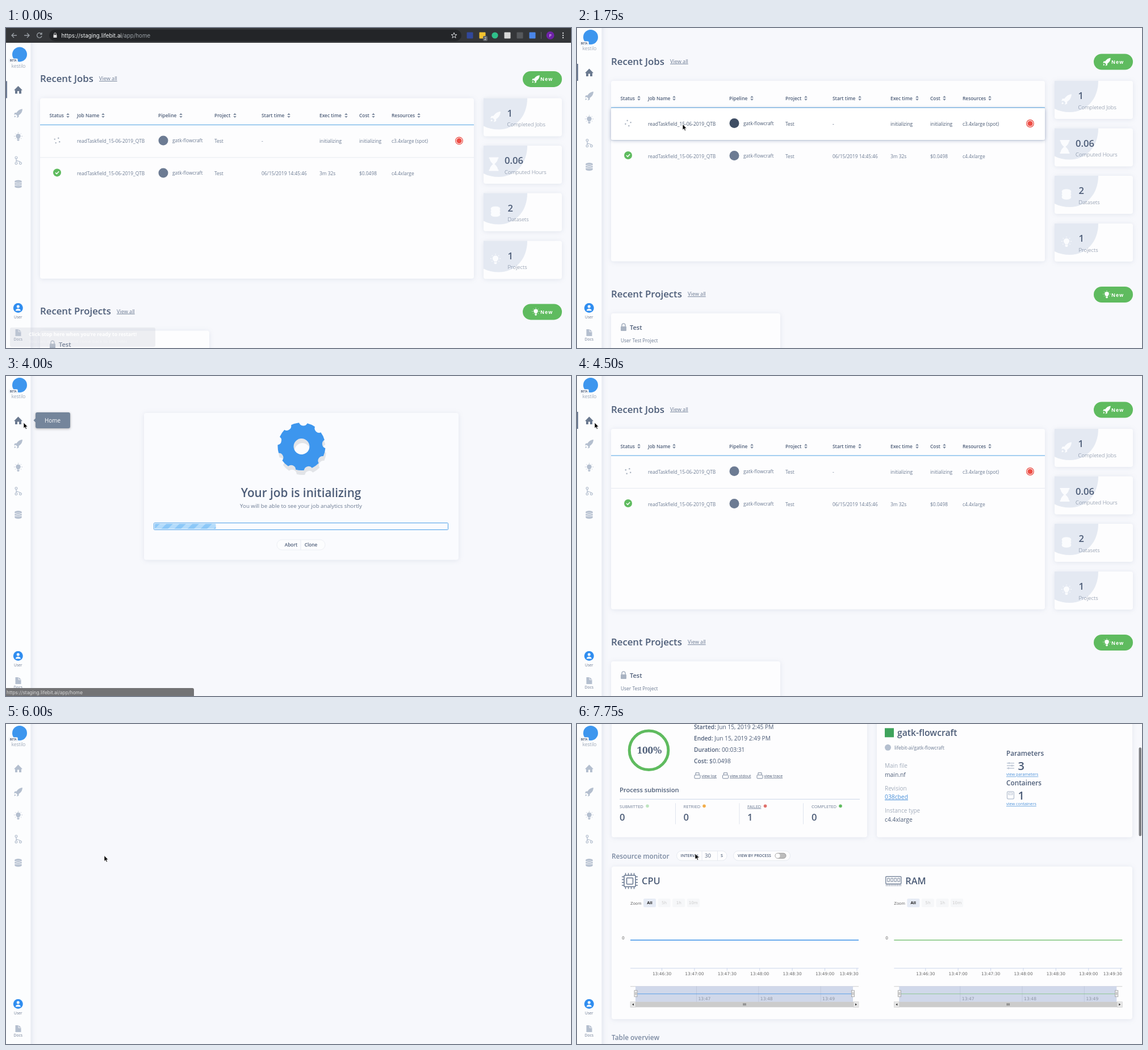
An HTML page for the animation above (8 s loop, 995 by 563 pixels).

```html
<!DOCTYPE html>
<html lang="en">
<head>
<meta charset="utf-8">
<title>Job dashboard</title>
<style>
html, body { margin: 0; width: 100%; height: 100%; overflow: hidden; background: #f7f8fc; }
svg { display: block; width: 100vw; height: 100vh; font-family: "Open Sans", sans-serif; fill: #6c7b93; }
text { white-space: pre; }
.l { font-weight: 300; }
.m { font-weight: 600; }
.b { font-weight: 700; }
.u { text-decoration: underline; }
.c { text-anchor: middle; }
.axis { font-family: "DejaVu Sans", sans-serif; }
.ui { font-family: Inter, sans-serif; }
.serif { font-family: "Noto Serif", serif; font-weight: 600; }
.card { fill: #fdfdfe; filter: drop-shadow(0 1px 4px rgba(80, 100, 140, .13)); }
.line { fill: none; stroke: #e3e8f0; }
.hover { fill: #fff; filter: drop-shadow(0 1px 3px rgba(70, 95, 140, .4)); }
.hot { fill: #4a5a73; }
.hot .mark { fill: #3f4e64; }
</style>
</head>
<body>
<svg id="stage" viewBox="0 0 995 563" preserveAspectRatio="none"></svg>
<script>
const INK = '#4d5d78', SOFT = '#6c7b93', PALE = '#b4bfcf', BLUE = '#3d96ee', GREEN = '#5fbb5f';
const JOB = 'readTaskfield_15-06-2019_QTB';
const LINK = '#4a90d9';

// Text is placed by the middle of its capitals.
const text = (x, y, s, size = 8.4, fill = '', cls = '', extra = '') =>
  `<text x="${x}" y="${(y + size * .36).toFixed(2)}" font-size="${size}" class="${cls}" ${fill && `fill="${fill}"`} ${extra}>${s}</text>`;
const rect = (x, y, w, h, r = 0, attrs = '') =>
  `<rect x="${x}" y="${y}" width="${w}" height="${h}" rx="${r}" ${attrs}/>`;
const dot = (x, y, r, fill, attrs = '') => `<circle cx="${x}" cy="${y}" r="${r}" fill="${fill}" ${attrs}/>`;
const path = (d, attrs = '') => `<path d="${d}" ${attrs}/>`;
const stroke = (color, width = 1) => `fill="none" stroke="${color}" stroke-width="${width}"`;
const hline = (x1, x2, y, color, w = 1) => path(`M${x1} ${y}H${x2}`, stroke(color, w));
const vline = (x, y1, y2, color, w = 1) => path(`M${x} ${y1}V${y2}`, stroke(color, w));
const group = (id, body, attrs = '') => `<g id="${id}" ${attrs}>${body}</g>`;
const at = (x, y, body, attrs = '', k = 1) => `<g transform="translate(${x} ${y}) scale(${k})" ${attrs}>${body}</g>`;
const repeat = (n, f) => Array.from({ length: n }, (_, i) => f(i)).join('');

const disc = 'a6.5 2.6 0 0 1 13 0v1.4a6.5 2.6 0 0 1 -13 0z';
const icons = {
  home: path('M-7.5 .7L0-7L7.5 .7H5.5V6.5H1.5V2H-1.5V6.5H-5.5V.7Z'),
  rocket: path('M7.5-7.5C2-7-1-4-3-1H-6L-7.5 2.5L-4 2L-1.5 4.5L-2.5 8L1 6.5V3.5C5 1 7-2 7.5-7.5ZM-6 4C-7 5-7 7-7 7S-5 7-4 6Z'),
  bulb: path('M-2 3.5C-2 2-4.3 1-4.3-1.2A4.3 4.3 0 0 1 4.3-1.2C4.3 1 2 2 2 3.5ZM-2 4.2H2V6L1 7H-1L-2 6Z') +
    path('M0-8V-6.6M-5.2-5.8L-4.3-4.9M5.2-5.8L4.3-4.9M-7.5-1H-6M7.5-1H6M-5.5 3.5L-4.5 2.6M5.5 3.5L4.5 2.6', 'stroke="currentColor"'),
  branch: path('M-3.5-3V3M-3.5-1C-3.5 2.5 3.5 0 3.5 3.5', 'fill="none" stroke="currentColor" stroke-width="1.2"') +
    [[-3.5, -5], [-3.5, 5], [4, 5]].map(p => dot(...p, 1.9, 'none', 'stroke="currentColor" stroke-width="1.2"')).join(''),
  data: path(`M-6.5-4.6${disc}M-6.5-.7${disc}M-6.5 3.4${disc}`, 'stroke="#fcfdfe" stroke-width=".7"'),
  glass: path('M-7-10H7V-8H6C6-4 2-1 1.2 0C2 1 6 4 6 8H7V10H-7V8H-6C-6 4-2 1-1.2 0C-2-1-6-4-6-8H-7Z')
};
const icon = (name, x, y, color, k = 1) => at(x, y, icons[name], `fill="${color}" color="${color}"`, k);
const sort = (x, y) => path(`M${x - 2.8} ${y - 1}L${x} ${y - 4.2}L${x + 2.8} ${y - 1}ZM${x - 2.8} ${y + 1}L${x} ${y + 4.2}L${x + 2.8} ${y + 1}Z`, 'fill="#7e8b9f"');
const pill = (x, y, w, h, body) => rect(x, y, w, h, h / 2, `fill="${GREEN}"`) + body;
const newButton = (y, name) => pill(910, y, 69, 28,
  icon(name, 933, y + 14, '#fff', .9) + text(941, y + 14.5, 'New', 8.6, '#fff', 'b', 'letter-spacing="1"'));

function jobRow(id, y, status, start, exec, cost, size) {
  return group(id, status + text(125, y, JOB) + dot(277, y - 1, 8.5, '', 'class="mark"').replace('fill=""', '') +
    text(293, y - 1, 'gatk-flowcraft') + text(367, y, 'Test') + text(450, y, start) +
    text(552, y, exec) + text(622, y, cost) + text(679, y, size));
}

function statCard(y, name, value, label, x) {
  return rect(841, y, 138, 67, 4, 'class="card"') +
    path(`M841 ${y}H918C918 ${y + 33} 896 ${y + 55} 868 ${y + 55}C858 ${y + 55} 849 ${y + 53} 841 ${y + 49}Z`, 'fill="#e4e9f2"') +
    icon(name, name === 'glass' ? 859 : 862, y + 32.5, '#fbfcfe', 1.2) +
    text(x, y + 26.5, value, 16.6, INK, 'm') + text(x, y + 46.5, label, 9.5, SOFT, 'l');
}

function homePage() {
  const columns = { Status: [76.5, 109], 'Job Name': [125, 171], Pipeline: [268, 308], Project: [367, 403],
    'Start time': [450, 498], 'Exec time': [552, 599], Cost: [622, 647], Resources: [679, 727] };
  const heads = Object.entries(columns).map(([s, [x, mark]]) => text(x, 123.5, s, 8.4, INK, 'm') + sort(mark, 123.5)).join('');
  const title = (y, s, x) => text(60, y, s, 16.8, INK, 'm') + text(x, y, 'View all', 9.1, SOFT, 'u');
  return title(58.5, 'Recent Jobs', 164) + newButton(45.5, 'rocket') +
    rect(60, 93, 764, 317.5, 4, 'class="card"') + heads + hline(60, 824, 140, '#4fa3e3') + hline(60, 824, 197.5, '#e6eaf1') +
    rect(60, 141, 764, 56, 3, 'id="hover1" class="hover"') + rect(60, 198, 764, 56, 3, 'id="hover2" class="hover"') +
    rect(173, 220, 5, 12, 0, 'id="selection" fill="#7fb8f5"') +
    jobRow('row1', 168.5, at(90, 167.5, `<g id="spinner">${repeat(4, i => {
      const a = i * 1.57 + .5;
      return dot(4.8 * Math.cos(a), 4.8 * Math.sin(a), 1.2, '#a7b0be');
    })}</g>`), '-', 'initializing', 'initializing', 'c3.4xlarge (spot)') +
    dot(798, 168, 6.3, '#fff', 'stroke="#e8473f" stroke-width="1.2"') + dot(798, 168, 4.6, '#ee4d45') +
    jobRow('row2', 225.5, dot(90, 224, 7, GREEN) + path('M87 224L89.3 226.3L93.2 221.9', stroke('#fff', 1.5)),
      '06/15/2019 14:45:46', '3m 32s', '$0.0498', 'c4.4xlarge') +
    statCard(93, 'rocket', '1', 'Completed Jobs', 882.5) + statCard(176.5, 'glass', '0.06', 'Computed Hours', 878) +
    statCard(260, 'data', '2', 'Datasets', 883.5) + statCard(344, 'bulb', '1', 'Projects', 883.5) +
    title(468, 'Recent Projects', 195) + newButton(455, 'bulb') +
    rect(60, 502, 298, 90, 4, 'class="card"') + rect(77, 525, 10, 8, 1, 'fill="#a9b3c2"') +
    path('M79 526V523A3 3 0 0 1 85 523V526', stroke('#a9b3c2', 1.6)) +
    text(93, 527, 'Test', 11, INK, 'm') + text(77, 549.5, 'User Test Project', 8.4);
}

function gearPath(teeth, r) {
  const step = 360 / teeth;
  const p = deg => [r * Math.sin(deg * Math.PI / 180), -r * Math.cos(deg * Math.PI / 180)].map(n => n.toFixed(2)).join(' ');
  return 'M' + p(-step / 4) + repeat(teeth, i =>
    `A${r} ${r} 0 0 1 ${p((i + .25) * step)}A8 8 0 0 0 ${p((i + .75) * step)}`) + 'ZM7 0H14A14 14 0 1 0 14 .01Z';
}

function waitPage() {
  const gear = gearPath(9, 42);
  return rect(243, 65, 554, 258.5, 4, 'class="card" style="fill:#fafbfe"') +
    at(522, 132, path(gear, 'class="gear" fill="#e2e4e8" fill-rule="evenodd"')) +
    at(520.5, 124, path(gear, `class="gear" fill="${BLUE}" fill-rule="evenodd"`)) +
    text(519.5, 206, 'Your job is initializing', 20.7, INK, 'm c') +
    text(519.5, 229, 'You will be able to see your job analytics shortly', 9.7, SOFT, 'c') +
    rect(260.5, 258.5, 518, 12, 1, stroke('#4a9fe8')) +
    rect(262, 260, 106, 9, 1, 'id="progress" fill="url(#stripes)"') +
    rect(477, 288, 85, 18, 9, 'fill="#fcfdfe" stroke="#edf0f5"') + vline(519, 288, 306, '#e6eaf1') +
    text(502, 297, 'Abort', 8.3, INK, 'm c') + text(537, 297, 'Clone', 8.3, INK, 'm c');
}

function chart(dx, name, glyph, color) {
  const ticks = repeat(7, i => {
    const s = 46 * 60 + 30 + 30 * i, x = i < 6 ? 149.5 + 57.4 * i : 479;
    const label = `13:${Math.floor(s / 60)}:${s % 60 ? '30' : '00'}`;
    return vline(i < 6 ? x : 493, 585, 590, '#ccd6eb') + text(x, 595, label, 7.4, '#666', 'c axis');
  });
  const zoom = ['All', '5h', '1h', '10m'].map((s, i) => rect(117 + 25.6 * i, 463, 22, 15, 2, `fill="${i ? '#f6f7f9' : '#e6ebf5'}"`) +
    text(128 + 25.6 * i, 470.5, s, 7.2, i ? '#ccc' : '#222', i ? 'c axis' : 'c b')).join('');
  const handle = x => rect(x - 2.5, 624.5, 5, 11, 0, 'fill="#f2f2f2" stroke="#999" stroke-width=".8"') + path(`M${x - .8} 627.5v5M${x + .8} 627.5v5`, stroke('#999', .7));
  const arrow = (x, d) => rect(x, 644.5, 9, 9.5, 0, 'fill="#e6e6e6" stroke="#ccc" stroke-width=".6"') + path(`M${x + 4.5 + d * 1.5} 649.2l${-d * 3}-2v4z`, 'fill="#333"');
  const nav = repeat(3, i => vline(210.5 + 109.3 * i, 617, 645, '#c0c9dc') + text(213.5 + 109.3 * i, 638.5, '13:4' + (7 + i), 7.6, '#8d95a5', 'axis'));
  return at(dx, 0, glyph + text(114, 432, name, 16.4, INK, 'm') + text(94, 471, 'Zoom', 6.8, '#666', 'axis') + zoom +
    text(79, 532, '0', 7.4, '#666', 'axis') + hline(94, 496, 536, color, 1.4) + hline(94, 496, 585.5, '#ccd6eb') + ticks +
    hline(94, 496, 617.5, '#ccc') + rect(103, 617, 383, 28, 0, 'fill="#d0d8ea"') + nav + hline(103, 486, 630.5, color, .8) +
    handle(103.5) + handle(486) + rect(103, 644.5, 384, 9.5, 0, 'fill="#ccc"') + arrow(94, -1) + arrow(487, 1) +
    path('M293 647v4M295 647v4M297 647v4', stroke('#444', .8)));
}

function jobPage() {
  const fact = (y, key, value) => text(206, y, `<tspan class="m">${key}</tspan> ${value}`, 10.2, INK);
  const log = (x, s) => rect(x, 245.5, 10, 6, 1, stroke(SOFT, .9)) + path(`M${x + 2} 245V241.5H${x + 8}V245`, stroke(SOFT, .9)) +
    text(x + 12.5, 247, s, 7, INK, 'u');
  const count = (x, label, value, color, dx, cls = '') => text(x, 300.5, label, 7.6, SOFT, cls) + dot(dx, 300, 2.8, color) + text(x, 320, value, 16.6, INK, 'm');
  const field = (y, key, value, cls = '') => text(542, y, key, 10, '#a3adbc') + text(542, y + 15, value, 10.3, cls ? LINK : INK, cls);
  const chip = rect(83, 422, 20, 20, 1, stroke(SOFT, 1.6)) + rect(87.5, 426.5, 11, 11, 1, stroke(SOFT, 1.6)) +
    path(repeat(4, i => `M${85.5 + 5 * i} 418v4M${85.5 + 5 * i} 442v4M79 ${424.5 + 5 * i}h4M103 ${424.5 + 5 * i}h4`), stroke(SOFT, 1.5));
  const memory = rect(79.5, 424, 27, 13, 1, stroke(SOFT, 1.3)) +
    path(repeat(4, i => `M${82.5 + 6 * i} 427h3.5v6h-3.5z`) + repeat(10, i => `M${80.5 + 2.8 * i} 437v4`), stroke(SOFT, .9));
  const sliders = path('M757 224.5h13M757 229h13M757 233.5h13M761 222.8v3.4M766 227.3v3.4M760 231.8v3.4', stroke(PALE, 1.2));
  const top =
    text(61, 26, 'Analysis Job Page', 16.8, INK, 'm') +
    text(61, 51, 'Name:', 9.5, INK, 'm') + text(98, 51, JOB, 9.8) + text(238, 51, 'ID:', 9.5, INK, 'm') +
    rect(254.5, 42, 135, 17, 2, 'fill="#e6ebf4" stroke="#d9e0ec"') + text(258.5, 51, '5d04f5bcfbdb9100c052bf23', 9.6, INK) +
    pill(825, 20, 72, 25, rect(841, 28, 10, 10, 1, stroke('#fff', 1.3)) + rect(844, 25.5, 10, 10, 1, 'fill="#fff"') +
      path('M849 28v5M846.5 30.5h5', stroke(GREEN, 1.2)) + text(859.5, 33, 'Clone', 8.5, '#fff', 'b')) +
    pill(904, 20, 71, 25, path('M920 38C920 32 923 31 927 31V28L932 32.5L927 37V34C924 34 922 34.5 920 38Z', 'fill="#fff"') +
      text(937, 33, 'Share', 8.5, '#fff', 'b')) +
    text(61, 81, 'MONITOR', 9.6, INK, 'm', 'letter-spacing=".8"') + text(140, 81, 'RESULTS', 9.6, INK, 'm', 'letter-spacing=".8"') +
    hline(61, 112, 89, BLUE, 1.6) +
    rect(61, 106.5, 450, 248.5, 4, 'class="card"') + rect(528, 106.5, 450, 248.5, 4, 'class="card"') +
    text(75, 129, 'STATUS: Completed', 11.1, INK, 'm') + dot(190, 129, 3.5, '#7cc47a') + text(542, 129, 'Pipeline and configuration', 11, INK, 'm') +
    hline(64, 508, 144.5, '#e6eaf1') + hline(531, 975, 144.5, '#e6eaf1') +
    dot(126.5, 202, 34.3, 'none', `stroke="${GREEN}" stroke-width="5"`) + text(127.5, 202, '100%', 17, INK, 'serif c') +
    fact(161, 'Started:', 'Jun 15, 2019 2:45 PM') + fact(181, 'Ended:', 'Jun 15, 2019 2:49 PM') +
    fact(201, 'Duration:', '00:03:31') + fact(221, 'Cost:', '$0.0498') +
    log(207, 'view log') + log(256.5, 'view stdout') + log(317, 'view trace') +
    text(75, 271.5, 'Process submission', 11.1, INK, 'm') + hline(75, 498, 288, '#ccd8e8') +
    [173.5, 286, 398.5].map(x => vline(x, 295, 332, '#dfe5ee')).join('') +
    count(75, 'SUBMITTED', '0', '#bfe5c0', 124) + count(187.5, 'RETRIED', '0', '#f3ae4b', 224) +
    count(300, 'FAILED', '1', '#e0716c', 331.5, 'u') + count(413, 'COMPLETED', '0', GREEN, 464) +
    rect(542, 163, 16, 16, 0, 'fill="#3fa35c"') + text(564, 171, 'gatk-flowcraft', 15.7, INK, 'm') +
    dot(547.5, 197, 5.5, PALE) + text(559, 197.5, 'lifebit-ai/gatk-flowcraft', 8.4) +
    field(229.5, 'Main file', 'main.nf') + field(269, 'Revision', '038cbed', 'u') + field(308.5, 'Instance type', 'c4.4xlarge') +
    text(756, 207, 'Parameters', 11.8, INK, 'm') + sliders + text(776.5, 229.5, '3', 20, INK, 'm') + text(756, 244.5, 'view parameters', 7.3, LINK, 'u') +
    text(756, 259, 'Containers', 11.8, INK, 'm') + rect(757.5, 274.5, 12, 13, 2, stroke(PALE, 1.2)) + rect(760, 277, 7, 3, 0, stroke(PALE, .9)) +
    text(776.5, 281.5, '1', 20, INK, 'm') + text(756, 296.5, 'view containers', 7.3, LINK, 'u');
  const monitor =
    text(61, 388, 'Resource monitor', 11.8, '#7a89a1', 'm') +
    rect(175.5, 379, 88.5, 17, 8.5, 'fill="#fdfdfe" stroke="#e6eaf1"') + vline(220, 379, 396, '#e6eaf1') + vline(247.5, 379, 396, '#e6eaf1') +
    text(182.5, 387.5, 'INTERVAL', 7.1, INK, 'm') + text(225, 387.5, '30', 9.5, INK) + text(253, 387.5, 'S', 7.1, INK, 'm') +
    rect(275.5, 379, 100, 17, 8.5, 'fill="#fdfdfe" stroke="#e6eaf1"') + text(283, 387.5, 'VIEW BY PROCESS', 6.9, INK, 'm') +
    rect(349, 383, 19, 9, 4.5, 'fill="#bdbdbd" stroke="#9a9a9a"') + dot(353.5, 387.5, 4, '#fff') +
    rect(61, 406.5, 917, 268.5, 4, 'class="card"') +
    chart(0, 'CPU', chip, '#3d92e8') + chart(464.3, 'RAM', memory, '#7cc47a') +
    text(61, 707, 'Table overview', 11.8, '#7a89a1', 'm');
  return top + group('monitor', monitor);
}

function sidebar() {
  const rest = ['rocket', 'bulb', 'branch', 'data'].map((n, i) => icon(n, 21.5, 119.5 + 41.5 * i, PALE)).join('');
  return rect(0, -10, 43.5, 600, 0, 'fill="#fcfdfe" style="filter:drop-shadow(1px 0 5px rgba(80,100,140,.16))"') +
    group('nav', dot(24, 16, 13, BLUE) + rect(5, 23.5, 15.5, 7, 1.5, 'fill="#fff" stroke="#dfe6f0" stroke-width=".6"') +
      text(12.7, 27.2, 'BETA', 4.8, INK, 'b c') + text(22, 36, 'kestilo', 8.7, SOFT, 'l c') +
      rect(0, 63, 2, 30, 0, `id="active" fill="${SOFT}"`) +
      group('home-icon', icons.home, 'transform="translate(21.5 78.5)"') + rest) +
    dot(21.3, 492.5, 8.5, '#2f8df0') + dot(21.3, 490, 2.5, '#fff') + path('M16.8 497.5C17 492.5 25.6 492.5 25.8 497.5Z', 'fill="#fff"') +
    text(21.3, 509, 'User', 6.7, SOFT, 'c') + path('M16.5 530H22.5L26.5 534V542H16.5Z', `fill="${PALE}"`) + path('M22 530V534.5H26.5', stroke('#fff', .8)) +
    text(21.3, 548, 'Docs', 6.8, SOFT, 'c');
}

function browserBar() {
  const gray = '#9aa0a6';
  const squares = [[817, '#31489b'], [839, '#f4c430'], [883, '#d8d8d8'], [905, '#55585c'], [927, '#4a86e8']];
  return rect(0, 0, 995, 26, 0, 'fill="#343639"') + rect(76, 3, 726, 20, 10, 'fill="#232528"') +
    path('M19 13H10M14 9L10 13L14 17M32 13H41M37 9L41 13L37 17M62.5 10.5A4.3 4.3 0 1 0 63 14M63 8V11H60', stroke(gray, 1.3)) +
    rect(83.5, 12, 6, 5, .6, 'fill="#ddd"') + path('M84.7 12V10.5A1.8 1.8 0 0 1 88.3 10.5V12', stroke('#ddd', 1)) +
    text(97.5, 13.2, `https://staging.lifebit.ai<tspan fill="${gray}">/app/home</tspan>`, 9.8, '#f1f3f4', 'ui') +
    path('M789 8L790.3 11.6H794L791 13.9L792.1 17.5L789 15.3L785.9 17.5L787 13.9L784 11.6H787.7Z', stroke('#d0d2d5', 1)) +
    squares.map(([x, c]) => rect(x - 5.5, 7.5, 11, 11, 1, `fill="${c}"`)).join('') + dot(861, 13, 5.6, '#2fc08a') +
    rect(840, 14, 8, 9, 2, 'fill="#5f6368"') + text(844, 18.7, '2', 6.5, '#fff', 'c') + vline(942.5, 7, 19, '#5f6368') +
    dot(958.5, 13, 7, '#6f22a8') + text(958.5, 13, 'P', 7, '#fff', 'c') + [9, 13, 17].map(y => dot(981, y, 1.2, '#d0d2d5')).join('');
}

const stage = document.getElementById('stage');
stage.innerHTML =
  `<defs><pattern id="stripes" width="23" height="9" patternUnits="userSpaceOnUse" y="260">
    <rect width="23" height="9" fill="#8cc8f8"/><path d="M9 0H20.5L11.5 9H0Z" fill="#b4dcfb"/></pattern></defs>` +
  rect(0, 0, 995, 563, 0, 'fill="#f7f8fc"') +
  group('home', homePage()) + group('wait', waitPage()) + group('job', jobPage()) + sidebar() +
  group('toast', rect(7, 527, 256, 34, 3, 'fill="#c9ced6" opacity=".32"') +
    text(40, 539, "Click stop here when you're ready to restart!", 8.6, '#fff', 'b') +
    text(40, 551, 'You can also pause and come back to this later', 8, '#fff', '', 'opacity=".4"')) +
  group('tooltip', rect(52, 64, 61, 28, 3, 'fill="#74859b" style="filter:drop-shadow(0 1px 2px rgba(0,0,0,.3))"') +
    path('M48.5 78L52 74.5V81.5Z', 'fill="#74859b"') + text(82, 78, 'Home', 9.9, '#fff', 'c')) +
  group('link', path('M0 549H328Q331 549 331 552V563H0Z', 'fill="#737375"') +
    text(1, 556.7, 'https://staging.lifebit.ai/app/home', 8.4, '#d8d8d8', 'ui')) +
  rect(989.5, 0, 4.5, 156, 2.2, 'id="thumb" fill="#7d7f83"') +
  group('browser', browserBar()) +
  group('cursor', path('M0 0V10L2.3 7.9L3.9 11.4L5.5 10.6L4 7.3H7.1Z', 'fill="#000" stroke="#fff" stroke-width=".7"'));

const el = id => document.getElementById(id);
const show = (id, on) => el(id).style.display = on ? '' : 'none';
const move = (node, x, y, rest = '') => node.setAttribute('transform', `translate(${x} ${y})${rest}`);

const route = [[500, 300, 118], [750, 254, 134], [1250, 186, 168], [2000, 186, 170], [2500, 211, 175], [2750, 205, 166],
  [3750, 31, 83], [4000, 31, 82], [4500, 31, 82], [5250, 168, 226], [5500, 172.5, 231.5], [6000, 173, 231.5], [6500, 208, 228], [8000, 208, 228]];
function along(t) {
  const i = Math.max(1, route.findIndex(p => p[0] >= t));
  const [a, b] = [route[i - 1], route[i]];
  const k = Math.max(0, (t - a[0]) / (b[0] - a[0]));
  return [a[1] + (b[1] - a[1]) * k, a[2] + (b[2] - a[2]) * k];
}

function draw(t) {
  const within = (a, b) => t >= a && t < b;
  const home = within(0, 2000) || within(4500, 6000);
  const drop = t < 250 ? 30.4 : t < 500 ? 14 : 0;
  const scroll = t < 7500 ? 0 : t < 7750 ? 60 : 155.7;
  const over1 = within(1250, 2000), over2 = within(5250, 6000);

  show('home', home);
  show('wait', within(2250, 4500));
  show('job', t >= 6500);
  show('monitor', t >= 6750);
  show('browser', t < 500);
  show('toast', t < 250);
  show('cursor', t >= 500);
  show('tooltip', within(3750, 4500));
  show('link', within(4000, 4500));
  show('active', home);
  show('hover1', over1);
  show('hover2', over2);
  show('selection', within(5500, 6000));
  show('thumb', scroll > 0);
  el('row1').classList.toggle('hot', over1);
  el('row2').classList.toggle('hot', over2);
  el('home-icon').setAttribute('fill', home || within(3750, 4500) ? '#6b7a90' : PALE);

  move(el('browser'), 0, (drop - 30.4) * .86);
  move(el('home'), 0, drop);
  move(el('nav'), 0, drop);
  move(el('job'), 0, -scroll);
  move(el('cursor'), ...along(t));
  el('thumb').setAttribute('y', scroll * .265);
  el('spinner').setAttribute('transform', `rotate(${t * .18})`);
  el('progress').setAttribute('width', 106 + (t - 2500) / 1000);
  el('stripes').setAttribute('x', 262 + t * .023 % 23);
  const turn = 24 + (t - 4000) * .09;
  document.querySelectorAll('.gear').forEach(g => g.setAttribute('transform', `rotate(${turn})`));
}

const start = performance.now();
function tick() {
  const t = (performance.now() - start) % 8000;
  draw(Math.floor(t / 250) * 250);
  requestAnimationFrame(tick);
}
tick();
</script>
</body>
</html>
```
